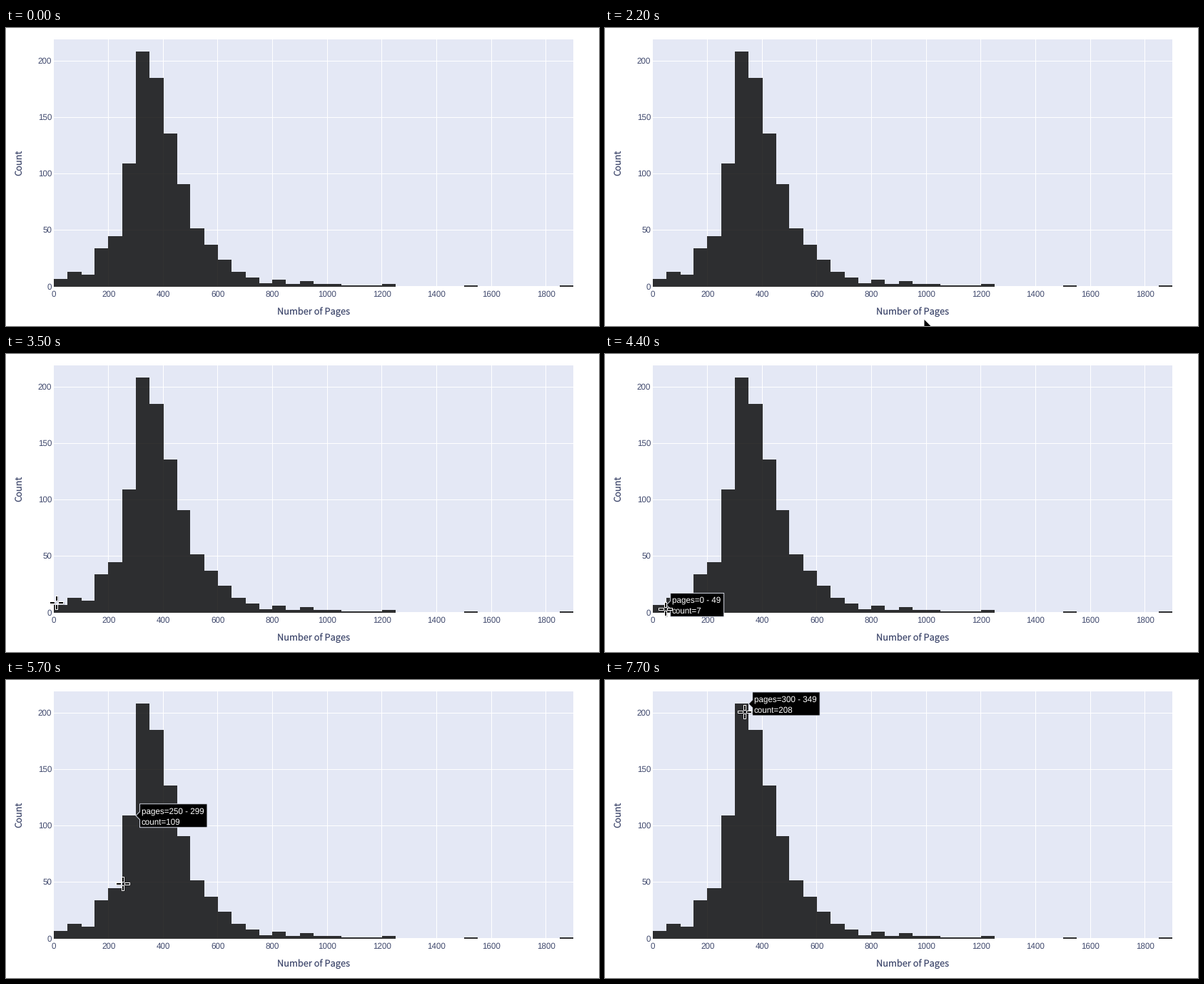
A matplotlib script for the animation above (8000 ms loop, 831 by 418 pixels).

```python
import math

import matplotlib.pyplot as plt
import numpy as np
from matplotlib.animation import FuncAnimation
from matplotlib.patches import Polygon, Rectangle
from matplotlib.transforms import Affine2D

W, H, DPI = 831, 418, 72            # at 72 dpi one point is one pixel
LEFT, RIGHT, TOP, BASE = 67, 795, 16, 363
BINS, STEP = 38, 50                 # bars, pages per bar
UNIT = 1.5845                       # pixels per count
PAPER, INK = "#E4E8F5", "#414a6e"
SERIES, TITLE = "Liberation Sans", "Noto Sans CJK JP"

COUNTS = np.zeros(BINS, int)
COUNTS[:25] = [7, 13, 11, 34, 45, 109, 208, 185, 136, 91, 52, 37, 24, 13, 8,
               3, 6, 2, 5, 2, 2, 1, 1, 1, 2]
COUNTS[[30, 37]] = 1

# Pointer stops: arrival and departure in ticks of 100 ms, then x, y.
STOPS = np.array([
    (7, 7, 104, 380), (9, 10, 248, 396), (18, 18, 464, 409),
    (19, 20, 462, 422), (22, 22, 447, 408), (24, 25, 352, 408),
    (33, 34, 71, 356), (35, 35, 71, 349), (37, 43, 77, 363),
    (46, 47, 102, 347), (50, 50, 122, 327), (57, 57, 164, 286),
    (63, 65, 185, 203), (69, 69, 202, 133), (74, 75, 204, 49),
    (77, 77, 196, 45)])
TIMES = STOPS[:, :2].ravel()
PATH_X, PATH_Y = (np.repeat(STOPS[:, k], 2) for k in (2, 3))

plt.rcParams["text.hinting"] = "none"
fig = plt.figure(figsize=((W + 1e-6) / DPI, (H + 1e-6) / DPI), dpi=DPI,
                 facecolor="white")
ax = fig.add_axes([0, 0, 1, 1])
ax.set(xlim=(0, W), ylim=(H, 0))
ax.axis("off")


def rect(x0, y0, x1, y1, color, **kw):
    patch = Rectangle((x0, y0), x1 - x0, y1 - y0, facecolor=color,
                      linewidth=0, **kw)
    return ax.add_patch(patch)


def label(x, y, text, size=11.6, family=SERIES, color=INK, **kw):
    return ax.text(x, y, text, fontsize=size, family=family, color=color,
                   va="baseline", **kw)


def bin_x(i):
    return LEFT + (RIGHT - LEFT) * i / BINS


def bar_top(i):
    return BASE - UNIT * COUNTS[i]


def edge(i):
    """Bar edge snapped to half a pixel, then to a pixel column."""
    x = bin_x(i)
    return int(x) + int(x * 4 + 0.2) % 2


def bar_height(count):
    """Whole pixels; very thin bars grow so that they stay visible."""
    height = UNIT * count
    return math.ceil(height) if height < 4 else round(height)


def draw_chart():
    rect(LEFT, TOP, RIGHT, BASE, PAPER)
    for pages in range(0, 1900, 200):
        x = bin_x(pages / STEP)
        if pages:
            rect(int(x), TOP, int(x) + 1, BASE, "white")
        label(x, 377.3, str(pages), ha="center")
    for count in range(0, 250, 50):
        y = int(BASE - UNIT * count)
        if count:
            rect(LEFT, y, RIGHT, y + 1, "white")
        label(64.2, y + 4.3, str(count), ha="right")
    rect(LEFT, BASE - 1, RIGHT, BASE + 1, "white")
    for i in np.flatnonzero(COUNTS):
        rect(edge(i), BASE - bar_height(COUNTS[i]), edge(i + 1), BASE,
             "black", alpha=0.805)
    label(431, 402, "Number of Pages", 12.8, TITLE, ha="center")
    label(22, 189, "Count", 12.8, TITLE, ha="center", rotation=90,
          rotation_mode="anchor")


def make_cross(move):
    """Four arms, each with a soft shadow, a white rim and a black core."""
    parts = []
    for grow, shift, color, alpha in [(1, 1, "black", 0.2),
                                      (1, 0, "white", 1),
                                      (0, 0, "black", 1)]:
        for ux, uy in [(0, -1), (0, 1), (-1, 0), (1, 0)]:
            cx, cy = 6 * ux + shift, 6 * uy + shift
            rx, ry = 1 + 2 * abs(ux) + grow, 1 + 2 * abs(uy) + grow
            parts.append(rect(cx - rx, cy - ry, cx + rx, cy + ry, color,
                              alpha=alpha, transform=move, zorder=6))
    return parts


def make_arrow(move):
    shape = [(0, 0), (0, 17), (4, 13.5), (6.5, 19.5), (9, 18.5),
             (6.5, 12.5), (12, 12)]
    return ax.add_patch(Polygon(shape, facecolor="black", edgecolor="white",
                                linewidth=0.9, transform=move, zorder=6))


def hovered_bar(x, y):
    i = int((x - LEFT) * BINS / (RIGHT - LEFT))
    return i if COUNTS[i] and y >= bar_top(i) else None


def show_tip(i):
    for part in (tip_box, *tip_lines):
        part.set_visible(i is not None)
    if i is None:
        return
    x, y = bin_x(i + 1), bar_top(i)
    first = STEP * i
    lines = f"pages={first} - {first + STEP - 1}", f"count={COUNTS[i]}"
    x0 = x + 5.5
    x1 = x0 + 94.5 - 6.5 * (15 - len(lines[0]))
    y0, y1 = y - 16.5, y + 16.5
    tip_box.set_xy([(x, y), (x0, y + 5.5), (x0, y1), (x1, y1),
                    (x1, y0), (x0, y0), (x0, y - 5.5)])
    for part, text, dy in zip(tip_lines, lines, (-2.9, 12.3)):
        part.set_text(text)
        part.set_position((x + 7.7, y + dy))


def update(tick):
    # The pointer is sampled at half rate while it climbs the bars.
    if 51 <= tick <= 61:
        tick -= (tick - 51) % 2
    x, y = (round(np.interp(tick, TIMES, p)) for p in (PATH_X, PATH_Y))
    pointer.clear().translate(x, y)
    inside = LEFT <= x < RIGHT and TOP <= y <= BASE
    arrow.set_visible(tick >= TIMES[0] and not inside)
    for part in cross:
        part.set_visible(inside)
    show_tip(hovered_bar(x, y) if inside else None)
    return [arrow, *cross, tip_box, *tip_lines]


draw_chart()
tip_box = ax.add_patch(Polygon([(0, 0), (1, 0), (1, 1)], facecolor="black",
                               edgecolor=PAPER, linewidth=0.9, zorder=4))
tip_lines = [label(0, 0, "", color="white", zorder=5) for _ in range(2)]
pointer = Affine2D()
cross = make_cross(pointer + ax.transData)
arrow = make_arrow(pointer + ax.transData)

anim = FuncAnimation(fig, update, frames=80, interval=100, repeat=True,
                     repeat_delay=0, blit=False)
plt.show()
```
